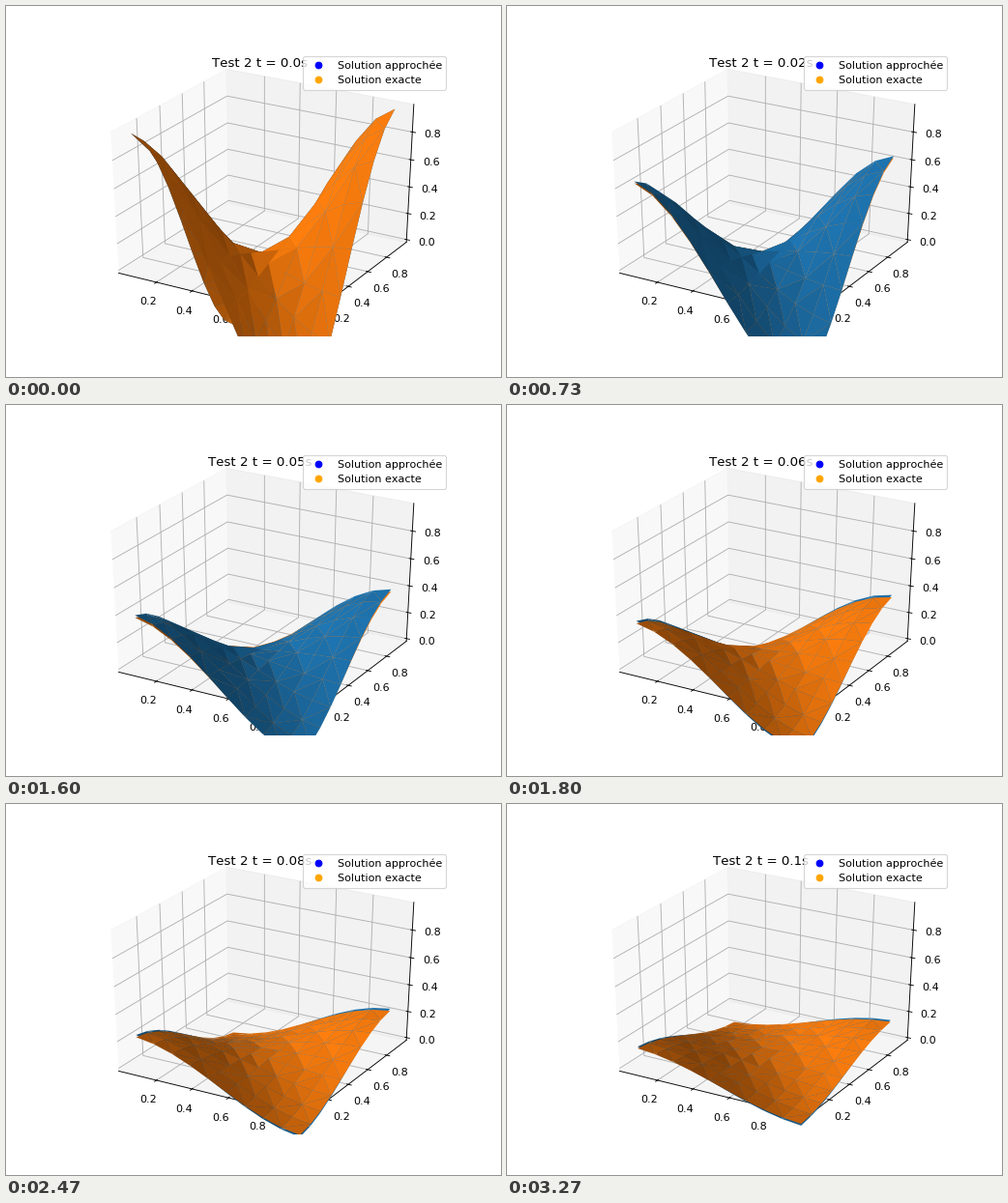
A matplotlib script that plays this animation: 512 px wide and 384 px high, repeating every 3.34 s.

```python
import numpy as np
import matplotlib.pyplot as plt
from matplotlib.animation import FuncAnimation
from matplotlib.colors import to_rgb
from matplotlib.lines import Line2D
from matplotlib.tri import Triangulation
from mpl_toolkits.mplot3d import Axes3D

STEPS = 50
STEP_MS = 1000 / 15
LOOP_MS = 3340
TICK_MS = 20
T_END = 0.1
CELLS = 10
LIGHT = np.array([-1, -1, 0.5])

plt.rcParams.update({
    "font.family": "DejaVu Sans",
    "text.kerning_factor": 6,
})


class WideAxes(Axes3D):
    """3D axes that fill their whole slot instead of a centred square."""

    def apply_aspect(self, position=None):
        pass


# Cell centres of a regular grid on the unit square
step = 1 / CELLS
centres = (np.arange(CELLS) + 0.5) * step
gx, gy = (g.ravel() for g in np.meshgrid(centres, centres))
mesh = Triangulation(gx, gy)
mode = np.cos(np.pi * gx) * np.cos(np.pi * gy)

# Decay rates: continuous, and five-point scheme with implicit Euler
rate = 2 * np.pi ** 2
grid_rate = 8 / step ** 2 * np.sin(np.pi * step / 2) ** 2
times = np.linspace(0, T_END, STEPS)
dt = T_END / STEPS


def padded(low, high, margin):
    pad = (high - low) * margin
    return low - pad, high + pad


def shaded(color, z):
    """Face colours between half and full strength, by angle to the light."""
    corners = np.stack([gx, gy, z], axis=-1)[mesh.triangles]
    a, b, c = corners.swapaxes(0, 1)
    normals = np.cross(a - b, b - c)
    shade = normals @ LIGHT / np.linalg.norm(normals, axis=1)
    level = (shade - shade.min()) / np.ptp(shade)
    return (0.5 + 0.5 * level[:, None]) * np.array(to_rgb(color))


fig = plt.figure(figsize=(6.4, 4.8), dpi=80)
ax = fig.add_subplot(axes_class=WideAxes)
ax.view_init(elev=30, azim=-60)
ax.set_box_aspect((1, 1, 1), zoom=3 ** 0.5 / 1.8294640721620434)

ticks = [0.2, 0.4, 0.6, 0.8]
ax.set_xticks(ticks)
ax.set_yticks(ticks)
ax.set_zticks([0.0] + ticks)
side = padded(*padded(centres[0], centres[-1], 0.05), 1 / 48)
ax.set_xlim(*side)
ax.set_ylim(*side)
ax.set_zlim(*padded(0, mode.max(), 1 / 48))

title = ax.text2D(0.5, 0.9425, "", transform=ax.transAxes, fontsize=12,
                  ha="center", va="baseline")


def dot(color, label):
    return Line2D([], [], linestyle="none", marker="o", color=color,
                  label=label)


ax.legend(handles=[dot("blue", "Solution approchée"),
                   dot("orange", "Solution exacte")],
          loc="upper right", numpoints=1)

surfaces = []


def draw_surface(color, amplitude):
    z = amplitude * mode
    surface = ax.plot_trisurf(mesh, z, color=color, shade=False)
    surface.set_facecolor(shaded(color, z))
    surfaces.append(surface)


def update(tick):
    # A solver step appears in the tick during which it falls due
    n = min(int((tick + 0.75) * TICK_MS / STEP_MS), STEPS - 1)
    while surfaces:
        surfaces.pop().remove()
    t = times[n]
    draw_surface("C0", (1 + dt * grid_rate) ** -n)
    draw_surface("C1", np.exp(-rate * t))
    title.set_text(f"Test 2 t = {round(float(t), 2)}s")
    return surfaces + [title]


anim = FuncAnimation(fig, update, frames=LOOP_MS // TICK_MS, interval=TICK_MS,
                     init_func=lambda: update(0), repeat=True, repeat_delay=0)
plt.show()
```
